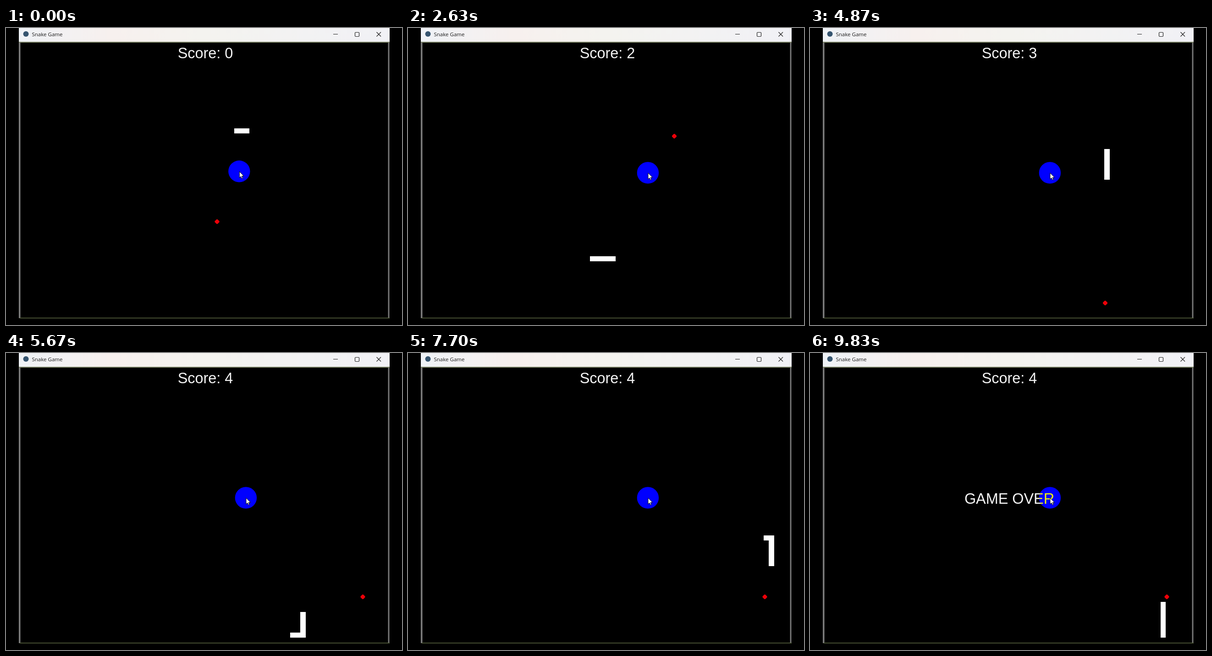
Recreate the animation shown at these times as an HTML page with a canvas. Size 864 px wide and 648 px high, loop 9860 ms.

```html
<!DOCTYPE html>
<html lang="en">
<head>
<meta charset="utf-8">
<title>Snake Game</title>
<style>
html, body { margin: 0; width: 100%; height: 100%; overflow: hidden; background: #000; }
canvas { display: block; }
</style>
</head>
<body>
<canvas id="stage" width="864" height="648"></canvas>
<script>
const ctx = document.getElementById('stage').getContext('2d');
const LOOP = 9860, STEP = 28.62, CELL = 11.15, LEFT = 497.5, TOP = 219.3;
const MOVES = 'R7 D18 L13 D1 R7 U6 L9 U6 L3 D18 R16 U38 R6 D48 L20 U3 R33 U16 L2 D19';
const DIRS = { R: [1, 0], L: [-1, 0], U: [0, -1], D: [0, 1] };
const START_LENGTH = 3;
const EATEN_AT = [38, 77, 128, 195];   // steps at which each food is eaten
const FOODS = [[460.5, 422.5], [408, 380], [581, 236], [644, 600], [778.5, 532]];

// Every cell the head visits, preceded by the body it starts with
const trail = [[0, 0], [1, 0], [2, 0]];
for (const move of MOVES.split(' ')) {
  const [dx, dy] = DIRS[move[0]];
  for (let n = +move.slice(1); n > 0; n--) {
    const [x, y] = trail[trail.length - 1];
    trail.push([x + dx, y + dy]);
  }
}
const lastStep = trail.length - START_LENGTH;

function rect(color, x, y, w, h) {
  ctx.fillStyle = color;
  ctx.fillRect(x, y, w, h);
}

function polygon(points, x, y) {
  ctx.beginPath();
  for (const [px, py] of points) ctx.lineTo(x + px, y + py);
  ctx.closePath();
}

function disc(color, x, y, r) {
  ctx.fillStyle = color;
  ctx.beginPath();
  ctx.arc(x, y, r, 0, 7);
  ctx.fill();
}

function text(value, x, y, font, color, align) {
  ctx.font = font;
  ctx.fillStyle = color;
  ctx.textAlign = align;
  ctx.fillText(value, x, y);
}

function drawWindow() {
  rect('#000', 0, 0, 864, 648);
  const bar = ctx.createLinearGradient(28, 0, 837, 0);
  bar.addColorStop(0, '#eff2f6');
  bar.addColorStop(0.25, '#f7f0ee');
  bar.addColorStop(0.5, '#f4f3ef');
  bar.addColorStop(1, '#f1f1f6');
  rect(bar, 28, 0, 809, 30);
  rect('#7c8468', 28, 30, 809, 2);
  rect('#8a8a8a', 28, 32, 2, 601);
  rect('#555', 30, 32, 2, 601);
  rect('#777', 833.5, 32, 3, 601);
  rect('#5a6640', 30, 632, 807, 1.5);

  disc('#35546f', 43.5, 13, 6);
  text('Snake Game', 56.5, 17.5, '11.5px "Open Sans", sans-serif', '#1c1c1c', 'left');
  ctx.strokeStyle = '#222';
  ctx.lineWidth = 1.2;
  ctx.beginPath();
  ctx.moveTo(714, 13.5); ctx.lineTo(724, 13.5);
  ctx.roundRect(761.5, 9.5, 9, 9, 1.5);
  ctx.moveTo(808.5, 9); ctx.lineTo(818, 18.5);
  ctx.moveTo(818, 9); ctx.lineTo(808.5, 18.5);
  ctx.stroke();
}

function drawSnake(step) {
  const length = START_LENGTH + EATEN_AT.filter(s => s < step).length;
  const end = step + START_LENGTH;
  for (const [col, row] of trail.slice(Math.max(0, end - length), end)) {
    const x = Math.round(LEFT + col * CELL), y = Math.round(TOP + row * CELL);
    const right = Math.round(LEFT + (col + 1) * CELL), bottom = Math.round(TOP + (row + 1) * CELL);
    rect('#fff', x, y, right - x, bottom - y);
  }
}

function drawFood([x, y]) {
  polygon([[5, -1], [5, 1], [1, 5], [-1, 5], [-5, 1], [-5, -1], [-1, -5], [1, -5]], x, y);
  ctx.fillStyle = '#ee0008';
  ctx.fill();
}

function drawPointer(t) {
  const p = Math.min(1, Math.max(0, (t - 100) / 400));
  const glide = p * p * (3 - 2 * p);
  const x = 508.8 + 14.6 * glide, y = 312.8 + 3.1 * glide;

  // The highlight inverts against whatever lies below it
  ctx.globalCompositeOperation = 'difference';
  disc('#00f', x, y, 23.7);
  ctx.globalCompositeOperation = 'source-over';

  polygon([[0, 0], [0, 13.5], [3, 10.7], [5.2, 15.3], [7.3, 14.3], [5.2, 9.9], [9.6, 9.7]], x + 0.5, y + 0.4);
  ctx.lineWidth = 1;
  ctx.strokeStyle = '#000';
  ctx.fillStyle = '#fff';
  ctx.fill();
  ctx.stroke();

  if (t >= 3300 && t < 4200) {
    const turn = t / 160;
    ctx.lineWidth = 2.6;
    for (const [color, sweep] of [['#1f7cf0', 7], ['#45b4f8', 4]]) {
      ctx.strokeStyle = color;
      ctx.beginPath();
      ctx.arc(x + 11.8, y + 0.5, 4.8, turn, turn + sweep);
      ctx.stroke();
    }
  }
}

function draw(t) {
  const clock = Math.floor(t / STEP + 0.6);
  const step = Math.min(lastStep, clock);
  const score = EATEN_AT.filter(s => s <= step).length;
  const font = '32.4px "Liberation Sans", Arial, sans-serif';
  drawWindow();
  text('Score: ' + score, 435, 66, font, '#f4f4f4', 'center');
  drawFood(FOODS[score]);
  drawSnake(step);
  if (clock > lastStep) text('GAME OVER', 435, 329, font, '#f4f4f4', 'center');
  drawPointer(t);
}

function frame() {
  draw(performance.now() % LOOP);
  requestAnimationFrame(frame);
}
frame();
</script>
</body>
</html>
```
